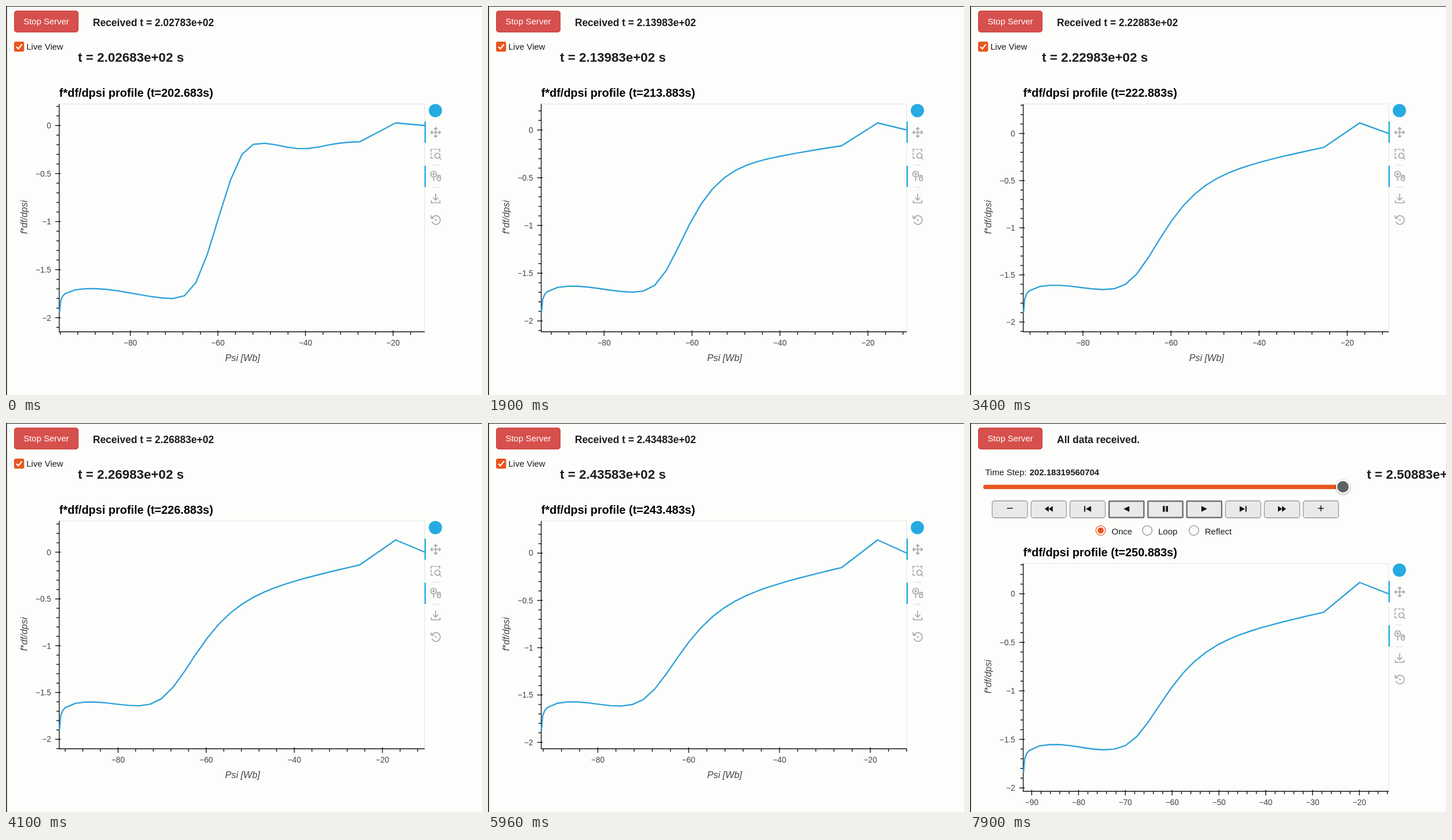
Write an HTML page with a canvas that moves like this. It is 827 px wide and 677 px high and loops after 8.1 s.

```html
<!DOCTYPE html>
<html lang="en">
<head>
<meta charset="utf-8">
<title>Live profile viewer</title>
<style>
  html, body { margin: 0; width: 100%; height: 100%; overflow: hidden; background: #fdfefb; }
  canvas { display: block; }
</style>
</head>
<body>
<canvas id="stage" width="827" height="677"></canvas>
<script>
const ctx = document.getElementById('stage').getContext('2d');
const LOOP = 8100, RELAXED_STEP = 158, LAST_STEP = 201, PLAYER_AT = 7710;
const SANS = '"Liberation Sans", Arial, sans-serif';
const BOX = { left: 92.5, right: 727.5, top: 170.5, bottom: 567 };
const INK = '#1c1c1e', ORANGE = '#e9541e', CURVE = '#30a2da', BLUE = '#26aae1', GREY = '#a1a6a9';

// The plot is auto-ranged, so the curve's extremes and its outer corner stay put on screen.
const LEFT_END = { x: 93, y: 534 }, PEAK = { x: 677, y: 203.5 }, CORNER_X = 614.5;

// Axes: zeroY, minValue, x20 (position of -20), unitX.
// Curve: crest and trough of the left plateau, then a step at center, then a straight slope to edge.
const START = { zeroY: 208, minValue: 1.949, x20: 672.5, unitX: 7.608,
  crest: 491, trough: 510, span: 165, center: 368, width: 20.5, edge: 236, slope: 0 };
const RELAXED = { zeroY: 229.5, minValue: 1.895, x20: 652.5, unitX: 7.66,
  crest: 484, trough: 491, span: 90, center: 309.5, width: 48, edge: 247.5, slope: 0.24 };
const END = { zeroY: 223.3, minValue: 1.84, x20: 676.5, unitX: 8.133,
  crest: 484.5, trough: 495, span: 100, center: 320.5, width: 45, edge: 255, slope: 0.22 };

// Simulated time in seconds against animation step.
const CLOCK = [[0, 202.683], [57, 213.883], [81, 218.783], [123, 226.883], [158, 236.383], [201, 250.883]];

const lerp = (a, b, u) => a + (b - a) * u;
const mix = (a, b, u) => Object.fromEntries(Object.keys(a).map(k => [k, lerp(a[k], b[k], u)]));

function timeAt(step) {
  const i = Math.max(1, CLOCK.findIndex(([s]) => s >= step));
  const [s0, t0] = CLOCK[i - 1], [s1, t1] = CLOCK[i];
  const elapsed = lerp(t0, t1, (step - s0) / (s1 - s0)) - CLOCK[0][1];
  return CLOCK[0][1] + Math.round(elapsed * 10) / 10;
}

function stateAt(step) {
  const u = Math.min(1, step / RELAXED_STEP), decay = 70;
  const w = (1 - Math.exp(-step / decay)) / (1 - Math.exp(-RELAXED_STEP / decay));
  const s = step <= RELAXED_STEP
    ? mix(START, RELAXED, w)
    : mix(RELAXED, END, (step - RELAXED_STEP) / (LAST_STEP - RELAXED_STEP));
  if (step <= RELAXED_STEP) s.zeroY = lerp(START.zeroY, RELAXED.zeroY, u);
  s.early = Math.max(0.001, (1 - Math.min(1, w)) ** 3);
  s.unitY = (LEFT_END.y - s.zeroY) / s.minValue;
  s.time = timeAt(step);
  return s;
}

function text(str, x, y, size, { weight = '', align = 'left', color = INK } = {}) {
  ctx.font = `${weight} ${size}px ${SANS}`;
  ctx.textAlign = align;
  ctx.fillStyle = color;
  ctx.fillText(str, x, y);
}

function stroke(color, width, draw) {
  ctx.strokeStyle = color;
  ctx.lineWidth = width;
  ctx.beginPath();
  draw(ctx);
  ctx.stroke();
}

function path(...pts) {
  pts.forEach(([x, y], i) => i ? ctx.lineTo(x, y) : ctx.moveTo(x, y));
}

function fill(color, draw) {
  ctx.fillStyle = color;
  ctx.beginPath();
  draw(ctx);
  ctx.fill();
}

const circle = (x, y, r) => { ctx.moveTo(x + r, y); ctx.arc(x, y, r, 0, Math.PI * 2); };

// Plateau and slope joined by a generalised logistic: symmetric early on, Gumbel-like later.
function profile(x, s) {
  const phase = Math.PI * Math.min(1, (x - 140) / s.span);
  const plateau = (s.crest + s.trough) / 2 - (s.trough - s.crest) / 2 * Math.cos(phase);
  const hump = 12.5 * s.early * Math.exp(-(((x - 515) / 52) ** 2));
  const ramp = s.edge + s.slope * (CORNER_X - x) + hump;
  const z = (x - s.center) / s.width;
  const share = 1 - (1 + s.early * Math.exp(-z - 0.045 * s.early * z ** 3)) ** (-1 / s.early);
  const drop = (LEFT_END.y - s.crest - 3) * Math.exp(-0.55 * Math.sqrt(x - LEFT_END.x));
  return lerp(ramp, plateau, share) + drop;
}

function drawCurve(s) {
  ctx.lineJoin = 'round';
  stroke(CURVE, 2.4, () => {
    ctx.moveTo(LEFT_END.x, LEFT_END.y);
    for (const x of [95, 98.5]) ctx.lineTo(x, profile(x, s));
    for (let k = 27; k >= 0; k--) {
      const x = CORNER_X - 18.9 * k + 5.5 * Math.sin(Math.PI * k / 14);
      ctx.lineTo(x, profile(x, s));
    }
    ctx.lineTo(PEAK.x, PEAK.y);
    ctx.lineTo(BOX.right, s.zeroY);
  });
  ctx.lineJoin = 'miter';
}

const label = v => String(v).replace('-', '\u2212');

function drawAxes(s) {
  const { left, right, top, bottom } = BOX;
  stroke('#e1e1ea', 1, () => path([left, top], [right, top], [right, bottom]));
  stroke('#111', 1.4, () => path([left, top], [left, bottom], [right, bottom]));

  const tickStyle = { color: '#444' };
  const yMin = Math.ceil((s.zeroY - bottom) / s.unitY * 10);
  const yMax = Math.floor((s.zeroY - top) / s.unitY * 10);
  for (let i = yMin; i <= yMax; i++) {
    const y = s.zeroY - i / 10 * s.unitY, major = i % 5 === 0;
    stroke('#111', 1.4, () => path([left - (major ? 7 : 5), y], [left + (major ? 2.5 : 0), y]));
    if (major) text(label(i / 10), 78.5, y + 5, 13.75, { ...tickStyle, align: 'right' });
  }

  const interval = (right - left) / s.unitX < 80 ? 10 : 20, minor = interval / 5;
  const valueAt = x => (x - s.x20) / s.unitX - 20;
  for (let i = Math.ceil(valueAt(left) / minor); i * minor <= valueAt(right); i++) {
    const x = s.x20 + (i * minor + 20) * s.unitX, major = i % 5 === 0;
    stroke('#111', 1.4, () => path([x, bottom - (major ? 2.5 : 0)], [x, bottom + (major ? 7 : 5)]));
    if (major) text(label(i * minor), x, 591, 13.75, { ...tickStyle, align: 'center' });
  }

  const axisStyle = { weight: 'italic', align: 'center', color: '#444' };
  text('Psi [Wb]', 411, 618, 16.25, axisStyle);
  ctx.save();
  ctx.translate(36.5, 367.5);
  ctx.rotate(-Math.PI / 2);
  text('f*df/dpsi', 0, 0, 16.25, axisStyle);
  ctx.restore();
}

function drawToolbar() {
  fill(BLUE, () => circle(746, 182, 11.5));
  fill(BLUE, () => { ctx.rect(727, 201, 2.5, 37); ctx.rect(727, 278, 2.5, 37); });
  stroke('#dadada', 1.2, () => { path([740, 277], [752, 277]); path([740, 315.5], [752, 315.5]); });

  const icon = (y, draw) => {
    ctx.save();
    ctx.translate(746.5, y);
    ctx.lineCap = ctx.lineJoin = 'round';
    stroke(GREY, 1.7, draw);
    ctx.restore();
  };
  icon(220, () => {
    path([-8, 0], [8, 0]);
    path([0, -8], [0, 8]);
    for (const d of [-1, 1]) {
      path([d * 6, -2.5], [d * 8.5, 0], [d * 6, 2.5]);
      path([-2.5, d * 6], [0, d * 8.5], [2.5, d * 6]);
    }
  });
  icon(258, () => {
    path([-8, -5], [-8, -8.5], [-5, -8.5]);
    path([-2, -8.5], [1, -8.5]);
    path([4, -8.5], [7, -8.5], [7, -5]);
    path([-8, -2], [-8, 1]);
    path([-8, 4], [-8, 7], [-5, 7]);
    circle(3, 2.5, 4.5);
    path([6.5, 6], [9, 8.5]);
  });
  icon(296, () => {
    circle(-3.5, -3.5, 5);
    path([-5.5, -3.5], [-1.5, -3.5]);
    path([-3.5, -5.5], [-3.5, -1.5]);
    path([-3.5, 2], [-3.5, 8]);
    ctx.roundRect(2.8, -1.5, 5.5, 9.5, 2.5);
    path([5.5, 0.5], [5.5, 3.5]);
  });
  icon(335, () => {
    path([0, -8], [0, 3]);
    path([-4, -1], [0, 3], [4, -1]);
    path([-7.5, 4], [-7.5, 7.5], [7.5, 7.5], [7.5, 4]);
  });
  icon(372, () => {
    ctx.arc(0.5, 0.5, 7.5, -2.75, 2.7);
    path([-8, -7], [-7.5, -2.5], [-3.2, -2.5]);
    circle(0.5, 0.5, 0.7);
  });
}

function drawPlot(s, offset) {
  ctx.save();
  ctx.translate(0, offset);
  text(`f*df/dpsi profile (t=${s.time.toFixed(3)}s)`, 92.5, 158, 20, { weight: 'bold', color: '#000' });
  drawAxes(s);
  drawCurve(s);
  drawToolbar();
  ctx.restore();
}

function drawCheckbox() {
  fill(ORANGE, () => ctx.roundRect(14, 62, 17.5, 17.5, 3));
  stroke('#fff', 2.2, () => path([18, 71], [21.5, 74.5], [27.8, 66.5]));
  text('Live View', 35.5, 76, 15);
}

function triangle(x, dir, w = 9) {
  path([x - dir * w / 2, 144.5], [x + dir * w / 2, 149.5], [x - dir * w / 2, 154.5]);
  ctx.closePath();
}

const bar = (x, w) => ctx.rect(x, 144.5, w, 10);
const dash = x => ctx.rect(x - 5, 147.7, 10, 1.5);
const PLAYER_ICONS = [
  dash,
  x => { triangle(x - 3.5, -1, 7); triangle(x + 3.5, -1, 7); },
  x => { bar(x - 6, 2); triangle(x + 1.5, -1); },
  x => triangle(x, -1, 10),
  x => { bar(x - 4.5, 3.5); bar(x + 1, 3.5); },
  x => triangle(x, 1, 10),
  x => { triangle(x - 1.5, 1); bar(x + 4, 2); },
  x => { triangle(x - 3.5, 1, 7); triangle(x + 3.5, 1, 7); },
  x => { dash(x); ctx.rect(x - 0.75, 143.5, 1.5, 10); },
];

function drawPlayer() {
  text('Time Step: ', 26.5, 91, 15);
  text('202.18319560704', 103.5, 91, 15, { weight: 'bold' });

  fill(ORANGE, () => ctx.roundRect(23, 107.5, 625, 7.5, 3.5));
  ctx.save();
  ctx.shadowColor = 'rgba(0,0,0,.35)';
  ctx.shadowBlur = 4;
  ctx.shadowOffsetY = 1;
  fill('#fff', () => circle(648, 111, 12));
  ctx.restore();
  fill('#5f6063', () => circle(648, 111, 10));

  PLAYER_ICONS.forEach((draw, i) => {
    const x = 38.5 + i * 67.55, active = i > 2 && i < 6, inset = active ? 0.5 : 0;
    const frame = () => ctx.roundRect(x + inset, 135.5 + inset, 61.5 - 2 * inset, 29.5 - 2 * inset, active ? 1 : 4);
    fill('#e9e9e9', frame);
    stroke(active ? '#707078' : '#9a9a9e', active ? 2.5 : 1.3, frame);
    fill('#111', () => draw(x + 30.75));
  });

  ['Once', 'Loop', 'Reflect'].forEach((name, i) => {
    const x = 227 + i * 81;
    stroke(i ? '#8a8a8e' : ORANGE, 1.3, () => circle(x, 187, 8.3));
    if (!i) fill(ORANGE, () => circle(x, 187, 5.3));
    text(name, x + 19, 194, 15);
  });
}

const sci = v => v.toExponential(5).replace('e+', 'e+0');

function draw(ms) {
  const step = Math.min(LAST_STEP, Math.ceil((Math.floor(ms / 10) + 1) * 3 / 10) - 1);
  const s = stateAt(step);
  const done = step === LAST_STEP, player = ms >= PLAYER_AT;

  ctx.fillStyle = '#fdfefb';
  ctx.fillRect(0, 0, 827, 677);
  fill('#1d1a1d', () => { ctx.rect(0, 0, 827, 1); ctx.rect(0, 0, 1.6, 677); });

  fill('#d6504d', () => ctx.roundRect(14, 8, 112, 38, 5));
  stroke('#c9433f', 1, () => ctx.roundRect(14.5, 8.5, 111, 37, 5));
  text('Stop Server', 70, 32, 15, { align: 'center', color: '#fff' });

  // The labels run one tick ahead of the plotted profile.
  const received = s.time + (step < 80 ? 0.1 : 0);
  const shown = s.time + (step > 0 && !done ? 0.1 : 0);
  text(done ? 'All data received.' : `Received t = ${sci(received)}`, 151, 35, 17.5, { weight: 'bold' });
  text(`t = ${sci(shown)} s`, player ? 689.5 : 125, 97, 22.5, { weight: 'bold' });

  if (player) drawPlayer();
  else drawCheckbox();
  drawPlot(s, player ? 74 : 0);
}

function tick() {
  draw(performance.now() % LOOP);
  requestAnimationFrame(tick);
}
tick();
</script>
</body>
</html>
```
